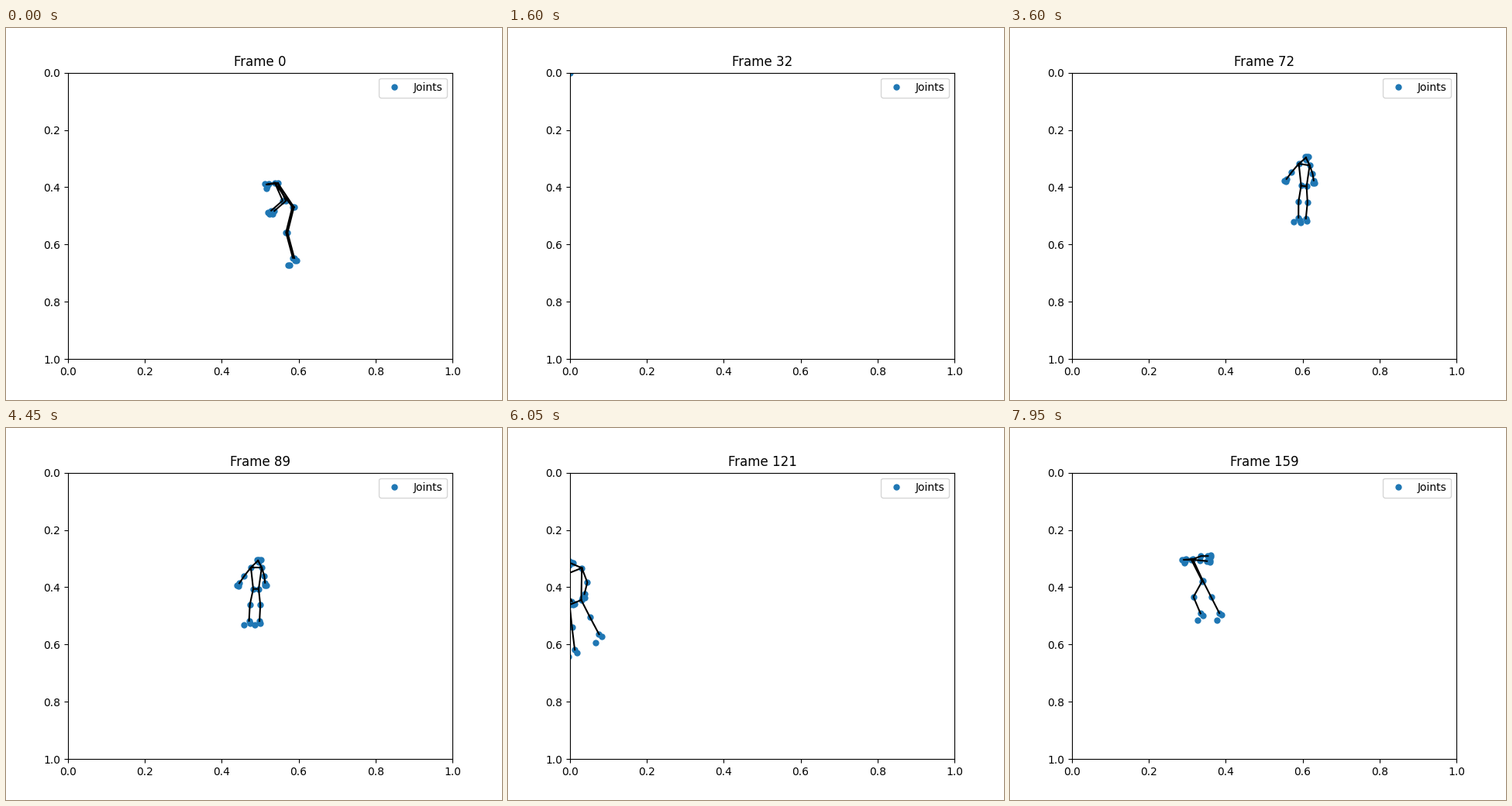
Recreate the animation shown at these times as a matplotlib script. Size 640 by 480 pixels, loop 8 s.

```python
import numpy as np
import matplotlib.pyplot as plt
from matplotlib.animation import FuncAnimation

FRAMES, INTERVAL = 160, 50
LEFT, TOP, WIDTH, HEIGHT = 80, 57.6, 496, 369.6   # axes box in stage pixels
STRIDE = 20                                       # frames per walking cycle


def toward(angle, length):
    """Vector at an angle in degrees from straight down, positive to the right."""
    a = np.radians(angle)
    return length * np.array([np.sin(a), np.cos(a)])


def limb(upper, lower, reach=1):
    """Angles of the two segments and how far foreshortening scales them."""
    return upper, lower, reach


def pose(hip, torso, lean, nod, side, legs, arms):
    """Sizes in pixels, angles in degrees; side is half the shoulder width."""
    return np.array([*hip, torso, lean, nod, side, *np.ravel([legs, arms])], float)


def moved(p, dx, dy, scale=1):
    q = p.copy()
    q[:2] += dx, dy
    q[[2, 5]] *= scale
    return q


stoop = pose((370.5, 231), 37.7, lean=-35, nod=-98, side=2,
             legs=[limb(-14, 15, 1.2)] * 2, arms=[limb(24, -49, 1.3)] * 2)
near = pose((493.5, 239), 52, lean=7, nod=2, side=10.5,
            legs=[limb(-19, -13), limb(-25, 36)],
            arms=[limb(-67, -34, 0.45), limb(-10, -115, 1.1)])
far = pose((353.5, 204.5), 19, lean=12, nod=9, side=6.5,
           legs=[limb(-12, 9), limb(-24, -14)],
           arms=[limb(-28, -32, 1.2), limb(6, 0, 1.2)])
front = pose((322.5, 207.7), 27.7, lean=1, nod=14, side=7,
             legs=[limb(-12, -3), limb(6, -3)],
             arms=[limb(-38, -34), limb(17, 6, 0.8)])
edge = pose((87, 225), 39, lean=-10, nod=-4, side=15,
            legs=[limb(6, 7), limb(27, 28, 0.85)],
            arms=[limb(29, 29), limb(21, -14)])
turn = pose((109.5, 224), 42.5, lean=-6, nod=-60, side=4.75,
            legs=[limb(-27, 5), limb(33, 51, 0.9)],
            arms=[limb(5, -23), limb(65, 65)])
back = pose((248.5, 197.5), 31, lean=-26, nod=-92, side=1,
            legs=[limb(-29, 23), limb(27, 27)],
            arms=[limb(85, 84, 0.72), limb(112, 90, 0.72)])

# Tracked stretches: start, pose, end, pose, ease-out power.
# Between stretches the tracker is lost and every joint falls to (0, 0).
STRETCHES = [
    (0, stoop, 19, near, 1),
    (19, near, 30, moved(near, 95, 4, 1.1), 1),
    (44, moved(far, 5, -1), 52, far, 1),
    (52, far, 66, moved(far, 31, 1), 1),
    (71, moved(front, 60, -4), 89, front, 1),
    (89, front, 121, edge, 1),
    (121, edge, 136, turn, 1),
    (136, turn, 159, back, 1.5),
]


def state(n):
    """Blended pose at frame n, or None while tracking is lost."""
    for start, p, end, q, power in STRETCHES:
        if start <= n <= end:
            u = (n - start) / (end - start)
            now = p + (q - p) * (1 - (1 - u) ** power)
            cycles = max(1, round((end - start) / STRIDE))
            swing = 8 * np.sin(2 * np.pi * cycles * u)
            limbs = now[6:].reshape(4, 3)         # legs a, b, then arms a, b
            limbs[:, :2] += swing * np.array([[1], [-1], [-1], [1]])
            return now
    return None


def skeleton(s):
    """Joint dots and bone lines built outward from the hips."""
    hip, (torso, lean, nod, side) = s[:2], s[2:6]
    limbs = s[6:].reshape(4, 3)
    neck = hip - toward(-lean, torso)
    nose = neck - toward(-nod, 0.33 * torso)
    tilt = np.clip((322 - hip[0]) / 400, -0.4, 0.4)
    across = side * np.array([-1, tilt])

    # The face turns with the head; the body always faces left.
    ear, mouth, eye = (nose + toward(nod + a, r * torso)
                       for a, r in ((90, 0.13), (0, 0.08), (205, 0.07)))
    dots = [nose, ear, mouth, eye, (ear + eye) / 2]
    lines = []
    ends = []
    for i, sign in enumerate((1, -1)):
        shoulder, socket = neck + sign * across, hip + sign * across / 2

        thigh, shin, reach = limbs[i]
        knee = socket + toward(thigh, 0.75 * torso * reach)
        ankle = knee + toward(shin, 0.75 * torso * reach)
        heel = ankle + toward(shin + 25, 0.12 * torso)
        toe = ankle + toward(shin - 48, 0.3 * torso)

        upper, fore, reach = limbs[2 + i]
        elbow = shoulder + toward(upper, 0.51 * torso * reach)
        wrist = elbow + toward(fore, 0.4 * torso * reach)
        tip = wrist + toward(fore, 0.12 * torso)
        fan = toward(fore + 90, 0.035 * torso)

        dots += [shoulder, socket, knee, ankle, heel, toe,
                 elbow, wrist, tip + fan, tip - fan]
        lines += [[nose, shoulder, elbow, wrist],
                  [shoulder, socket, knee, ankle]]
        ends.append((shoulder, socket))
    lines += [list(pair) for pair in zip(*ends)]
    return dots, lines


def to_data(pts):
    return (np.array(pts) - (LEFT, TOP)) / (WIDTH, HEIGHT)


fig, ax = plt.subplots(figsize=(6.4, 4.8), dpi=100)
ax.set_xlim(0, 1)
ax.set_ylim(1, 0)
joints, = ax.plot([], [], "o", color="tab:blue", markersize=5, label="Joints")
bones, = ax.plot([], [], color="black", linewidth=1.5)
title = ax.set_title("Frame 0")
ax.legend(loc="upper right")


def draw(n):
    now = state(n)
    if now is None:
        joints.set_data([0], [0])
        bones.set_data([], [])
    else:
        dots, lines = skeleton(now)
        joints.set_data(*to_data(dots).T)
        gap = [[np.nan, np.nan]]
        bones.set_data(*np.vstack([part for line in lines
                                   for part in (to_data(line), gap)]).T)
    title.set_text(f"Frame {n}")
    return joints, bones, title


anim = FuncAnimation(fig, draw, frames=FRAMES, init_func=lambda: draw(0),
                     interval=INTERVAL, repeat=True, repeat_delay=0, blit=False)
plt.show()
```
